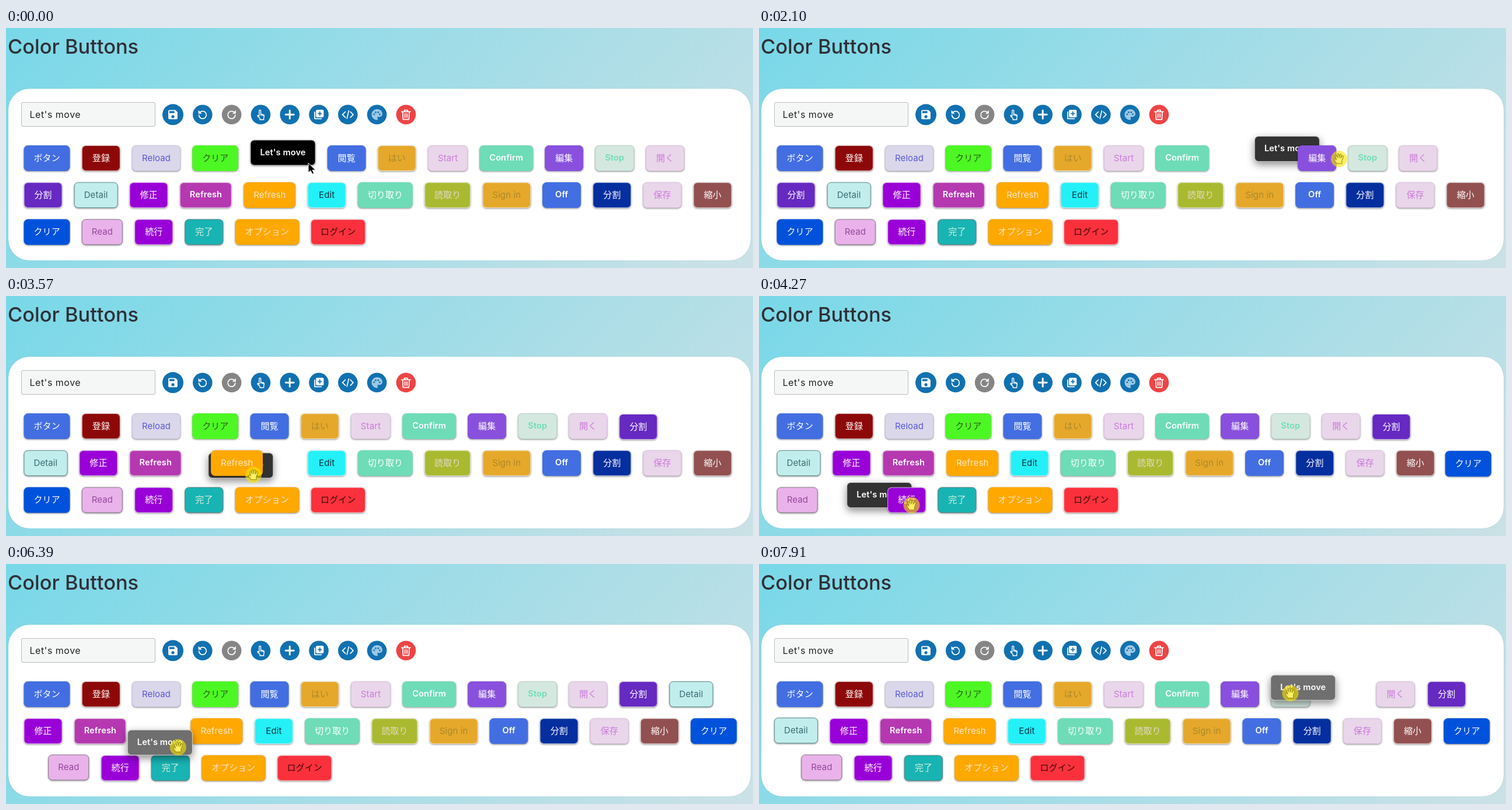
Write an HTML page that moves like this. It is 1280 px wide and 411 px high and loops after 8000 ms.

```html
<!DOCTYPE html>
<html lang="ja">
<head>
<meta charset="utf-8">
<title>Color Buttons</title>
<style>
html, body { margin: 0; width: 100%; height: 100%; overflow: hidden; }
body {
  position: relative;
  background: linear-gradient(135deg, #78d8e8, #cbe1e6);
  font-family: Inter, "Noto Sans CJK JP", "Noto Sans CJK SC", "Noto Sans CJK", sans-serif;
}
body > *, .btn, #cursor > * { position: absolute; box-sizing: border-box; }
h1 { left: 3px; top: 12px; margin: 0; font: 500 34.4px/40px Inter, sans-serif; color: #302f35; white-space: nowrap; }
#card { left: 4px; top: 104px; width: 1272px; height: 294px; border-radius: 36px; background: #fff; box-shadow: 0 0 1px rgba(90,140,150,.5); }
#field { left: 25.5px; top: 127px; width: 230px; height: 42px; border: 1px solid #b9bcbb; border-radius: 3px; background: #f5f7f6; color: #222; font-size: 16px; line-height: 40px; padding-left: 14px; letter-spacing: .5px; }
svg { left: 0; top: 0; overflow: visible; }
#list { left: 0; top: 0; }
.btn { left: 0; top: 0; height: 43.5px; min-width: 66.2px; padding: 0 16px; line-height: 41px; border: 1px solid transparent; background-origin: border-box; border-radius: 7px; text-align: center; white-space: nowrap; font-size: 15px; letter-spacing: .1px; box-shadow: 0 1px 3px rgba(0,0,0,.45); }
.bold { font-weight: 600; font-size: 14.6px; }
#cursor { left: 0; top: 0; z-index: 99; }
#ring { left: -14px; top: -14px; width: 28px; height: 28px; border-radius: 50%; background: rgba(248,228,0,.6); }
</style>
</head>
<body>
<h1>Color Buttons</h1>
<div id="card"></div>
<div id="field">Let's move</div>
<svg id="tools" width="1280" height="411"></svg>
<div id="list"></div>
<div id="cursor">
  <svg id="arrow" width="1" height="1"><path d="M0 0V16.5L4 13L6.7 19L9.6 17.7L7 12H12.3Z" stroke="#fff"/></svg>
  <svg id="hand" width="1" height="1"><path d="M-4 8L-8 2C-9 0-7-1-5.5 .5L-4.5 1.5L-6-4C-6.3-6.3-4-6.5-3.3-4.5L-2.5-2L-2.8-7.5C-2.7-9.5-.3-9.5-.2-7.5L.2-2L1.2-7.2C1.7-9 4-8.5 3.7-6.5L3-1.500L5-5C6-6.5 7.8-5.5 7.2-3.5L5 3.5V8Z" fill="#fff" stroke="#111" stroke-width="1.1" stroke-linejoin="round"/></svg>
  <div id="ring"></div>
</div>
<script>
const $ = id => document.getElementById(id);

// Toolbar icons, each drawn in a box of 24 units
const line = (d, w = 2) => `<path d="${d}" fill="none" stroke="#fff" stroke-width="${w}" stroke-linecap="round" stroke-linejoin="round"/>`;
const turn = line('M6 8.5A7.3 7.3 0 1 1 4.8 13') + '<path d="M3.8 3.5V10.3H10.6Z" fill="#fff"/>';
const blue = '#1171b0';
const holes = [[6.5, 11.5], [9.5, 7.5], [14.5, 7.5], [17.5, 11.5]];
const icons = [
  '<path d="M17 3H5a2 2 0 0 0-2 2v14a2 2 0 0 0 2 2h14a2 2 0 0 0 2-2V7zm-5 16a3 3 0 1 1 0-6 3 3 0 0 1 0 6zm3-10H5V5h10z" fill="#fff"/>',
  turn,
  `<g transform="matrix(-1 0 0 1 24 0)">${turn}</g>`,
  line('M9 15V4.5a1.6 1.6 0 0 1 3.2 0V11l5 1.2q2 .5 1.7 2.5L18 19v3h-7.5v-2.5L6 15q-.5-2 1.3-1.5L9 15M12.2 11v2.5M14.8 11.8v2M17 12.5v2', 1.6),
  line('M12 4V20M4 12H20', 3.4),
  line('M4 7V20H17') + '<rect x="6.5" y="2.5" width="15" height="15" rx="2" fill="#fff"/>' +
    `<path d="M14 6V14M10 10H18" stroke="${blue}" stroke-width="2"/>`,
  line('M7 6.5L1.5 12L7 17.5M17 6.5L22.5 12L17 17.5M13.8 4.5L10.2 19.5', 1.9),
  '<path d="M12 1.5a10.5 10.5 0 0 0 0 21c1 0 1.8-.8 1.8-1.8 0-1.2-.9-1.5-.9-2.5 0-1 .8-1.7 1.8-1.7H17a5.7 5.7 0 0 0 5.7-5.7C22.7 5.5 18 1.5 12 1.5z" fill="#9cc8e4"/>' +
    holes.map(([x, y]) => `<circle cx="${x}" cy="${y}" r="1.7" fill="${blue}"/>`).join(''),
  line('M3.5 6.5H20.5M9 6V3.2H15V6M5.5 6.5L6.3 21.5H17.7L18.5 6.5M10 10.5V17.5M14 10.5V17.5'),
];
$('tools').innerHTML = icons.map((art, i) => {
  const x = i ? 287 + 49.8 * i : 286;
  const fill = i == 2 ? '#858585' : i == 8 ? '#ee4444' : blue;
  return `<circle cx="${x}" cy="148.3" r="${i ? 16.8 : 18}" fill="${fill}"/>` +
    `<g transform="translate(${x - 10.5} 137.8) scale(.875)">${art}</g>`;
}).join('');

// label, background, text colour, border, bold
const pale = '#ffffffb0', pink = ['#e9d6ea', '#cc78da', '#dfc2e2'];
const amber = ['#e5a82b', '#ab882a', pale], royal = ['#436ee2', '#fff'];
const mint = ['#6edcb7', '#fff'], orange = ['#ffa800', '#fbe8c8'], violet = ['#9900d8', '#fff', pale];
const specs = [
  ['ボタン', ...royal], ['登録', '#8d0909', '#fff', pale], ['Reload', '#dbd7ea', '#5757d6', '#c9c4e2'],
  ['クリア', '#4df723', '#2b5a1a'], ['閲覧', ...royal], ['はい', ...amber], ['Start', ...pink],
  ['Confirm', ...mint, '', 1], ['編集', '#8950dd', '#fff'], ['Stop', '#d4e8df', '#6edcb7', '#b8d4c8', 1],
  ['開く', ...pink], ['分割', '#6629c1', '#fff', pale], ['Detail', '#c1eeed', '#3a6b70', '#5f9090'],
  ['修正', ...violet], ['Refresh', '#b538b1', '#fff', pale, 1], ['Refresh', ...orange],
  ['Edit', '#23f0f7', '#134', pale], ['切り取り', ...mint], ['読取り', '#a9ba30', '#e2d9c6', pale],
  ['Sign in', ...amber], ['Off', ...royal, '', 1], ['分割', '#052e9f', '#fff', pale], ['保存', ...pink],
  ['縮小', '#925050', '#fff', pale], ['クリア', '#0052dc', '#fff'], ['Read', '#eab2ea', '#94479c', '#8a7a90'],
  ['続行', ...violet], ['完了', '#18b4b4', '#d8f0d8', '#4a8085'], ['オプション', ...orange],
  ['ログイン', '#fa313d', '#400808', pale],
];

function makeButton([label, background, color, borderColor, bold]) {
  const el = document.createElement('div');
  el.className = bold ? 'btn bold' : 'btn';
  el.textContent = label;
  Object.assign(el.style, { background, color, borderColor: borderColor || background });
  $('list').append(el);
  const { width } = el.getBoundingClientRect();
  return { el, width, step: width + 20 };
}
const items = specs.map(makeButton);
items.forEach((item, i) => item.el.style.zIndex = 2 * i);
const drag = makeButton(["Let's move", '#000', '#fff', pale, 1]);

const drop = 5000, loop = 8000, pitch = 63.2;
const rowY = row => 201 + pitch * row;

// Places with the held button over a slot; each row passed hands its edge item to the next
function layout({ at, rows }, slot) {
  const order = [...items.slice(0, at), drag, ...items.slice(at)];
  const home = [], starts = [0];
  rows.forEach((count, row) => {
    let x = 30.5;
    const end = starts[row] + count;
    for (const item of order.slice(starts[row], end)) {
      home.push({ x, row });
      x += item.step;
    }
    starts.push(end);
  });
  const forward = slot > at;
  const gaps = rows.map((_, row) =>
    (row == home[at].row ? drag : order[forward ? starts[row] : starts[row + 1] - 1]).step);
  const places = home.map(({ x, row }, k) => {
    const y = rowY(row);
    if (forward && k > at && k <= slot) {
      if (k > starts[row]) return { x: x - gaps[row], y };
      return { x: home[k - 1].x + order[k - 1].step - gaps[row - 1], y: rowY(row - 1) + 1 };
    }
    if (k >= slot && k < at) {
      if (k + 1 < starts[row + 1]) return { x: x + gaps[row], y };
      return { x: 30.5 + gaps[row + 1] - order[k].step, y: rowY(row + 1) - 1 };
    }
    return { x, y };
  });
  const [own] = places.splice(at, 1);
  return { places, own: { ...home[at], y: own.y } };
}

// Key points of the drag: time, x, y
const path = [
  [0, 418, 194], [250, 418, 190], [1030, 418, 190], [1850, 835, 186], [2080, 839, 185],
  [2100, 848, 185], [2300, 1028, 190], [2420, 1030, 215], [2520, 985, 264], [2820, 732, 273],
  [3140, 455, 268], [3360, 440, 267], [3900, 200, 270], [4000, 193, 285], [4050, 185, 300],
  [4270, 150, 319], [4700, 247, 329], [5450, 247, 329], [5800, 203, 325], [6150, 150, 292],
  [6900, 330, 266], [7210, 604, 264], [7500, 865, 262], [7600, 930, 228], [7680, 942, 192],
  [7840, 934, 190], [8060, 755, 189],
];
const mix = (a, b, k) => a + (b - a) * k;
const clamp = k => Math.max(0, Math.min(1, k));
const ease = k => k < .5 ? 4 * k ** 3 : 1 - 4 * (1 - k) ** 3;
const between = (t, a, b) => t >= a && t < b;
const place = (el, x, y) => el.style.transform = `translate(${x}px,${y}px)`;
const show = (id, on) => $(id).style.display = on ? '' : 'none';

function pathAt(t) {
  const n = path.findIndex(p => p[0] > t), a = path[n - 1], b = path[n];
  const k = (t - a[0]) / (b[0] - a[0]);
  return [mix(a[1], b[1], k), mix(a[2], b[2], k)];
}

// An item comes before the held button when its home centre does
function slotAt(t, { base }) {
  const [x, y] = pathAt(t), top = rowY(Math.round((y - 201) / pitch));
  return items.filter((item, i) => {
    const p = base.places[i];
    return p.y < top || p.y == top && p.x + item.width / 2 < x + drag.width / 2;
  }).length;
}

function planDrag(at, rows, from, to) {
  const plan = { at, rows, steps: [] };
  plan.base = layout(plan, at);
  for (let time = from, last = at; time < to; time += 10) {
    const slot = slotAt(time, plan);
    if (slot != last) plan.steps.push({ time, places: layout(plan, slot).places });
    last = slot;
  }
  return plan;
}
const first = planDrag(4, [12, 13, 6], 1030, drop);
const second = planDrag(28, [13, 13, 5], 5800, loop);

function draw(t) {
  const plan = t < drop ? first : second;
  items.forEach((item, i) => {
    let { x, y } = plan.base.places[i];
    for (const { time, places } of plan.steps) {
      if (t < time) break;
      const k = ease(clamp((t - time) / 250));
      x = mix(x, places[i].x, k);
      y = mix(y, places[i].y, k);
    }
    place(item.el, x, y);
  });

  // A resting button is raised under the pointer
  const held = between(t, 1030, drop) || t >= 5800;
  const [x, y] = pathAt(t), { own } = plan.base;
  const rest = held ? 0 : t < drop ? 1 : ease(clamp((t - drop) / 200));
  place(drag.el, mix(x, own.x, rest), mix(y, own.y - 9.5, rest));
  Object.assign(drag.el.style, {
    zIndex: 2 * plan.at - 1,
    background: !held ? '#000' : t < drop ? '#323232' : '#6f6f6f',
    boxShadow: held ? '0 5px 14px rgba(0,0,0,.45)' : '',
  });

  // The pointer runs a little ahead of the held button
  const [px, py] = pathAt(t + 50), grip = clamp((t - 5400) / 400);
  const arrow = t < 250 || between(t, 2720, 2920);
  place($('cursor'), px + mix(100, 75, grip), py + mix(38, 32, grip));
  show('arrow', arrow);
  show('hand', !arrow);
  show('ring', between(t, 890, drop) || t >= 5700);
}

const begin = performance.now();
function tick() {
  draw((performance.now() - begin) % loop);
  requestAnimationFrame(tick);
}
tick();
</script>
</body>
</html>
```
